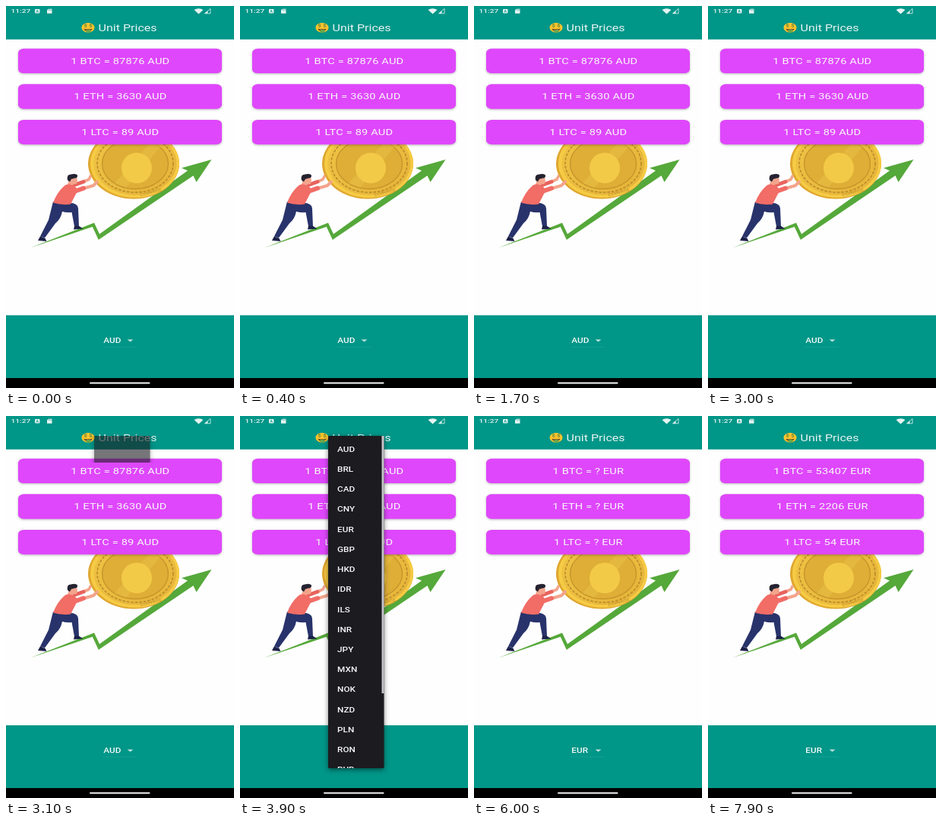
Write an HTML page that moves like this. It is 300 by 500 pixels and loops after 8 s.

```html
<!DOCTYPE html>
<html lang="en">
<head>
<meta charset="utf-8">
<title>Unit Prices</title>
<style>
  html, body { margin: 0; width: 100%; height: 100%; overflow: hidden; background: #fefefe; }
  svg { display: block; width: 100vw; height: 100vh; }
  text { font-family: Roboto, "Open Sans", sans-serif; fill: #f8fafa; }
  .card { fill: #df47fc; filter: drop-shadow(0 1.5px 1.8px rgba(0, 0, 0, .27)); }
  .price { font-size: 14.6px; letter-spacing: .18px; text-anchor: middle; }
  .code { font-size: 11.7px; font-weight: 500; letter-spacing: .1px; }
  .title { font-size: 16.06px; fill: #e6f4f2; }
  .clock { font-size: 10.2px; font-weight: 500; fill: #e6f4f2; }

  .before, .asking, .after, .picked, .menu, .sheet, .items { animation: 8s step-end infinite; }
  .before { animation-name: before; }
  .asking { animation-name: asking; }
  .after { animation-name: after; }
  .picked { animation-name: picked; }
  .menu { animation-name: menu; }
  .sheet { animation-name: sheet; transform-origin: 116px 26px; fill: #1c1b20;
           filter: drop-shadow(0 2px 3px rgba(0, 0, 0, .5)); }
  .items { animation-name: items; }

  @keyframes before { 0% { opacity: 1 } 71.25%, 100% { opacity: 0 } }
  @keyframes asking { 0% { opacity: 0 } 71.25% { opacity: 1 } 98.75%, 100% { opacity: 0 } }
  @keyframes after { 0% { opacity: 0 } 98.75%, 100% { opacity: 1 } }
  @keyframes picked { 0% { opacity: 0 } 71.25%, 100% { opacity: 1 } }
  @keyframes menu {
    0% { opacity: 0 } 38.75% { opacity: .6 } 40% { opacity: 1 }
    73.75% { opacity: .5 } 75%, 100% { opacity: 0 }
  }
  @keyframes sheet {
    0% { transform: scaleY(.08) } 40% { transform: scaleY(.6) }
    41.25%, 100% { transform: scaleY(1) }
  }
  @keyframes items { 0% { opacity: 0 } 41.25% { opacity: .5 } 42.5%, 100% { opacity: 1 } }
</style>
</head>
<body>
<svg viewBox="0 0 300 500" preserveAspectRatio="none">
  <defs>
    <clipPath id="sheetClip"><path d="M116 26h73.500v435h-73.500z"/></clipPath>
    <linearGradient id="gold" x2="1" y2="1">
      <stop stop-color="#f0c445"/><stop offset="1" stop-color="#e4b338"/>
    </linearGradient>
  </defs>
  <rect width="300" height="500" fill="#fefefe"/>

  <g id="growth" fill="#55a83a">
    <path d="M32 316.500 116 283.800 123 298.500 239 215.500 231 212 270.500 201 250.500 230.500 246.500 222 121.800 306 113.800 289Z"/>
  </g>

  <g id="coin">
    <ellipse cx="168" cy="206.500" rx="60" ry="46" fill="#dfa62f"/>
    <ellipse cx="169.500" cy="206" rx="58.500" ry="44.800" fill="#f6cb45"/>
    <ellipse cx="170" cy="206" rx="54.500" ry="41.500" fill="url(#gold)"/>
    <ellipse cx="170" cy="206" rx="50" ry="38" fill="none" stroke="#b98a2a" stroke-width="1.600" stroke-dasharray="3.500 2"/>
    <ellipse cx="170" cy="206.500" rx="43.500" ry="33" fill="#deae36" stroke="#c4932b" stroke-width="1.300"/>
    <path d="M143 232 191 177 205 182 158 238Z" fill="#ecc247" opacity=".5"/>
    <circle cx="172" cy="212" r="20" fill="#f3ca48"/>
    <g transform="translate(177 249.500) rotate(-15) scale(1 .75)">
      <text style="font-size:7px;fill:#b98a2a">COINAGE</text>
    </g>
  </g>

  <g id="man">
    <g fill="none" stroke-linecap="round" stroke-linejoin="round">
      <path d="M103 229.500 109 227 111 223" stroke="#f3a48c" stroke-width="3.600"/>
      <path d="M88 235 102 230" stroke="#e8635d" stroke-width="5"/>
    </g>
    <path d="M62 256 84 257.500Q94.500 258 95 265L96 288.500 90 288.500 86.500 270Q80 271 74 269 72 279 65 284.500L51 303.500 45 301.500 56 280Z" fill="#28336b"/>
    <path d="M45 301.500 51.500 304 53.500 308 42 307ZM90 288 96 288 101.500 291.500 89 292.500Z" fill="#1c2148"/>
    <path d="M83 226 93.500 225Q94.500 231 92.500 233L88.500 233.500 87 236 81 234Z" fill="#f3a48c"/>
    <path d="M81 228Q79.500 220.500 85 220.500 92 218.500 94 221.500 94.500 225.500 90 225.500L86 226.500 84 230Z" fill="#252331"/>
    <path d="M76 236Q80 231.500 87 234.500 96 237.500 92.500 245L85 259.500Q73 261 62 257.500 67 244 76 236Z" fill="#f16d66"/>
    <g fill="none" stroke-linecap="round" stroke-linejoin="round">
      <path d="M103 238.500 115 235 120 230" stroke="#f3a48c" stroke-width="4"/>
      <path d="M85 240 92 242 102 238.500" stroke="#f16d66" stroke-width="6"/>
    </g>
  </g>

  <path d="M0 0H300V43.700H0ZM0 404.800H300V487H0Z" fill="#009688"/>
  <path d="M0 486.900H300V500H0Z"/>
  <rect x="110" y="492.400" width="79.500" height="2" rx="1" fill="#f4f4f4"/>

  <g id="status" fill="#e6f4f2">
    <rect x="38" y="4" width="6.500" height="5.500" rx="1"/>
    <path d="M39.700 8.500 41.200 5 42.700 8.500M40.300 7.300H42.100" fill="none" stroke="#009688" stroke-width=".7"/>
    <path d="M56 3.800H60.500V9.800H54V5.500Z"/>
    <path d="M56.500 4.500V6M58 4.500V6M59.300 4.500V6" stroke="#009688" stroke-width=".6"/>
    <path d="M247.500 5Q253.500 1.500 259.500 5L253.500 10.500ZM261.500 9.800 265.500 6.300V9.800Z"/>
    <path d="M261.500 9.800 269 3.500V9.800Z" fill="none" stroke="#e6f4f2" stroke-width=".8"/>
  </g>

  <g id="face" transform="translate(108 28.300) scale(1 .75)">
    <circle r="8.500" fill="#fcc42d"/>
    <path d="M-5.500 2Q0 3.500 5.500 2 4.500 6.500 0 6.500-4.500 6.500-5.500 2Z" fill="#6b4520"/>
    <path d="M-2.500 3.500H3.500V8Q.5 10.500-2.500 8Z" fill="#6ba54a"/>
    <text x="-5.500" y="0" style="font-size:7.500px;font-weight:500;fill:#4c7a34">$</text>
    <text x="1.200" y="0" style="font-size:7.500px;font-weight:500;fill:#4c7a34">$</text>
  </g>

  <g id="cards"></g>
  <g id="picker">
    <path d="M159.500 436.600H167.500L163.500 439.500Z" fill="#c2e3df"/>
    <path d="M128 446.300H172" stroke="#fff" stroke-opacity=".15" stroke-width=".6"/>
  </g>
  <g class="menu">
    <rect class="sheet" x="116" y="26" width="73.500" height="435" rx="1.400"/>
    <g clip-path="url(#sheetClip)">
      <g class="items" id="items">
        <path d="M186.500 26h3v337h-3z" fill="#c5c4c7"/>
      </g>
    </g>
  </g>
</svg>
<script>
  const byId = id => document.getElementById(id);

  function add(parent, tag, attrs, content = '') {
    const node = document.createElementNS('http://www.w3.org/2000/svg', tag);
    for (const key in attrs) node.setAttribute(key, attrs[key]);
    node.textContent = content;
    return parent.appendChild(node);
  }

  // The phone screen is shown squeezed to three quarters of its height.
  const write = (parent, x, y, content, className) =>
    add(parent, 'text', { class: className, transform: `translate(${x} ${y}) scale(1 .75)` }, content);

  write(byId('status'), 6.5, 9.2, '11:27', 'clock');
  write(byId('cards'), 121.5, 32.6, 'Unit Prices', 'title');

  const prices = [['BTC', 87876, 53407], ['ETH', 3630, 2206], ['LTC', 89, 54]];
  prices.forEach(([coin, aud, eur], i) => {
    const cards = byId('cards'), y = 55.8 + i * 46.55;
    add(cards, 'rect', { class: 'card', x: 16, y, width: 268, height: 32.3, rx: 7.3, ry: 5.5 });
    const line = (value, className) => write(cards, 150.3, y + 20, `1 ${coin} = ${value}`, `price ${className}`);
    line(`${aud} AUD`, 'before');
    line('? EUR', 'asking');
    line(`${eur} EUR`, 'after');
  });

  write(byId('picker'), 128.2, 440.7, 'AUD', 'code before');
  write(byId('picker'), 128.2, 440.7, 'EUR', 'code picked');

  'AUD BRL CAD CNY EUR GBP HKD IDR ILS INR JPY MXN NOK NZD PLN RON RUB'.split(' ')
    .forEach((code, i) => write(byId('items'), 128, 46.7 + i * 26.23, code, 'code'));
</script>
</body>
</html>
```
